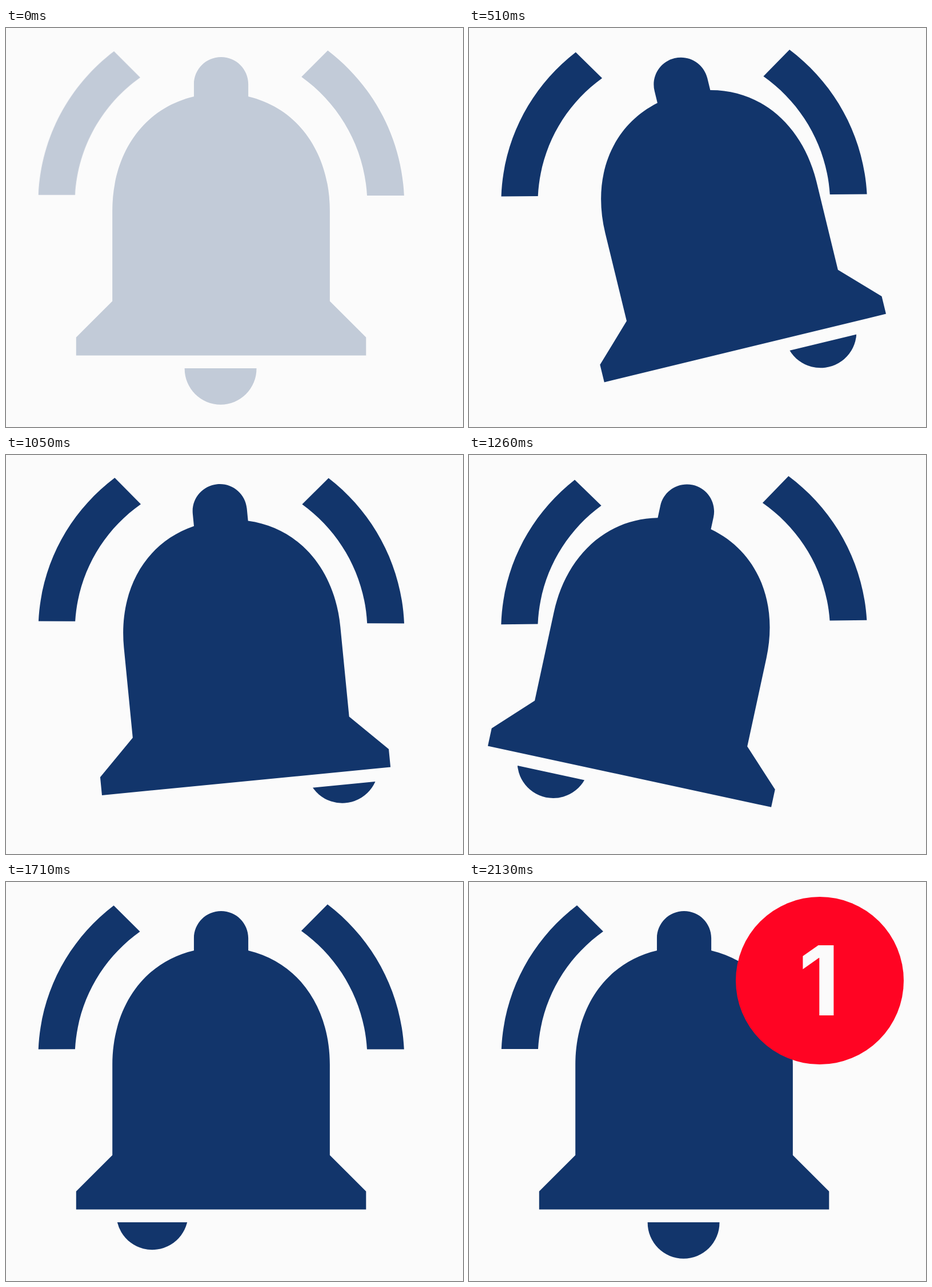
These frames come from a looping animation (800 by 700 pixels, 2.73 s). An HTML page:

```html
<!DOCTYPE html>
<html lang="en">
<head>
<meta charset="utf-8">
<title>Notification bell</title>
<style>
  html, body { margin: 0; width: 100%; height: 100%; overflow: hidden; background: #fbfbfb; }
  svg { display: block; width: 800px; height: 700px; }
  #ringer { fill: #12356b; }
  #badge circle { fill: #ff0423; }
  #badge text { fill: #fbfbfb; font-family: Inter, Roboto, sans-serif; font-weight: 700; }
</style>
</head>
<body>
<svg viewBox="0 0 800 700">
  <clipPath id="below"><rect x="0" y="597" width="800" height="120"/></clipPath>
  <g id="ringer">
    <g id="waves">
      <path transform="translate(-8.4 -44.1) scale(32.1)"
        d="M7.58 4.08 6.15 2.65C3.75 4.48 2.17 7.3 2.03 10.5h2c.15-2.65 1.51-4.97 3.55-6.42z"/>
      <path transform="translate(-15.4 -46.4) scale(32.42)"
        d="M19.97 10.5h2c-.15-3.2-1.73-6.02-4.12-7.85l-1.42 1.43c2.02 1.45 3.39 3.77 3.54 6.42z"/>
    </g>
    <g id="bell">
      <path transform="translate(-4.1 -28.3) scale(31.72)"
        d="M18 11c0-3.07-1.64-5.64-4.5-6.32V4c0-.83-.67-1.5-1.5-1.5s-1.5.67-1.5 1.5v.68C7.63 5.36 6 7.92 6 11v5l-2 2v1h16v-1l-2-2z"/>
      <g clip-path="url(#below)"><circle id="clapper" cx="375.6" cy="597.8" r="62.9"/></g>
    </g>
  </g>
  <g id="badge">
    <circle cx="614" cy="173" r="147"/>
    <text id="count">1</text>
  </g>
</svg>
<script>
const LOOP = 2730, STEP = 30, FIRST_HOLD = 90;
const el = id => document.getElementById(id);
const ringer = el('ringer'), waves = el('waves'), bell = el('bell'),
      clapper = el('clapper'), badge = el('badge'), count = el('count');

const clamp = p => Math.min(1, Math.max(0, p));
const easeSine = p => (1 - Math.cos(Math.PI * clamp(p))) / 2;

// Swing in degrees: `first` is the time of the first peak, `half` the time
// between peaks. It eases out of rest, swings on to peak `last`, and eases back.
function swing(t, { amp, first, half, last, quicken = 0 }) {
  const ramp = .77;
  const u = (t - first) / half;
  const phase = u + quicken * u * Math.abs(u);
  const beyond = Math.max(-phase, phase - last, 0);
  const peak = Math.min(last, Math.max(0, phase));
  return -amp * Math.cos(Math.PI * peak) * easeSine(1 - beyond / ramp);
}

const bellSwing = { amp: 17, first: 460, half: 246.5, last: 4 };
const clapperSwing = { amp: 22.5, first: 578, half: 259, last: 5, quicken: .0185 };
const waveSwing = { amp: .8, first: 621, half: 308, last: 4 };

// Set the digit by its ink: 123px tall, right edge at 639, baseline at 234.
function placeCount() {
  const ctx = document.createElement('canvas').getContext('2d');
  ctx.font = '700 100px Inter, Roboto, sans-serif';
  const ink = ctx.measureText('1');
  const size = 123 / ink.actualBoundingBoxAscent * 100;
  count.setAttribute('font-size', size);
  count.setAttribute('x', 639 - ink.actualBoundingBoxRight * size / 100);
  count.setAttribute('y', 234);
}

const turn = (node, angle, y) =>
  node.setAttribute('transform', `rotate(${angle} 376.5 ${y})`);

function draw(now) {
  let t = Math.floor((now % LOOP) / STEP + 1e-6) * STEP;
  if (t < FIRST_HOLD) t = 0;
  ringer.setAttribute('opacity', .245 + .755 * clamp((t - 60) / 215));
  turn(bell, swing(t, bellSwing), 122);
  turn(clapper, swing(t, clapperSwing), 122);
  turn(waves, swing(t, waveSwing), 330);
  const size = easeSine((t - 1740) / 390);
  badge.style.display = size > 0 ? '' : 'none';
  badge.setAttribute('transform', `translate(614 173) scale(${size}) translate(-614 -173)`);
}

placeCount();
const start = performance.now();
function tick() {
  draw(performance.now() - start);
  requestAnimationFrame(tick);
}
tick();
</script>
</body>
</html>
```
